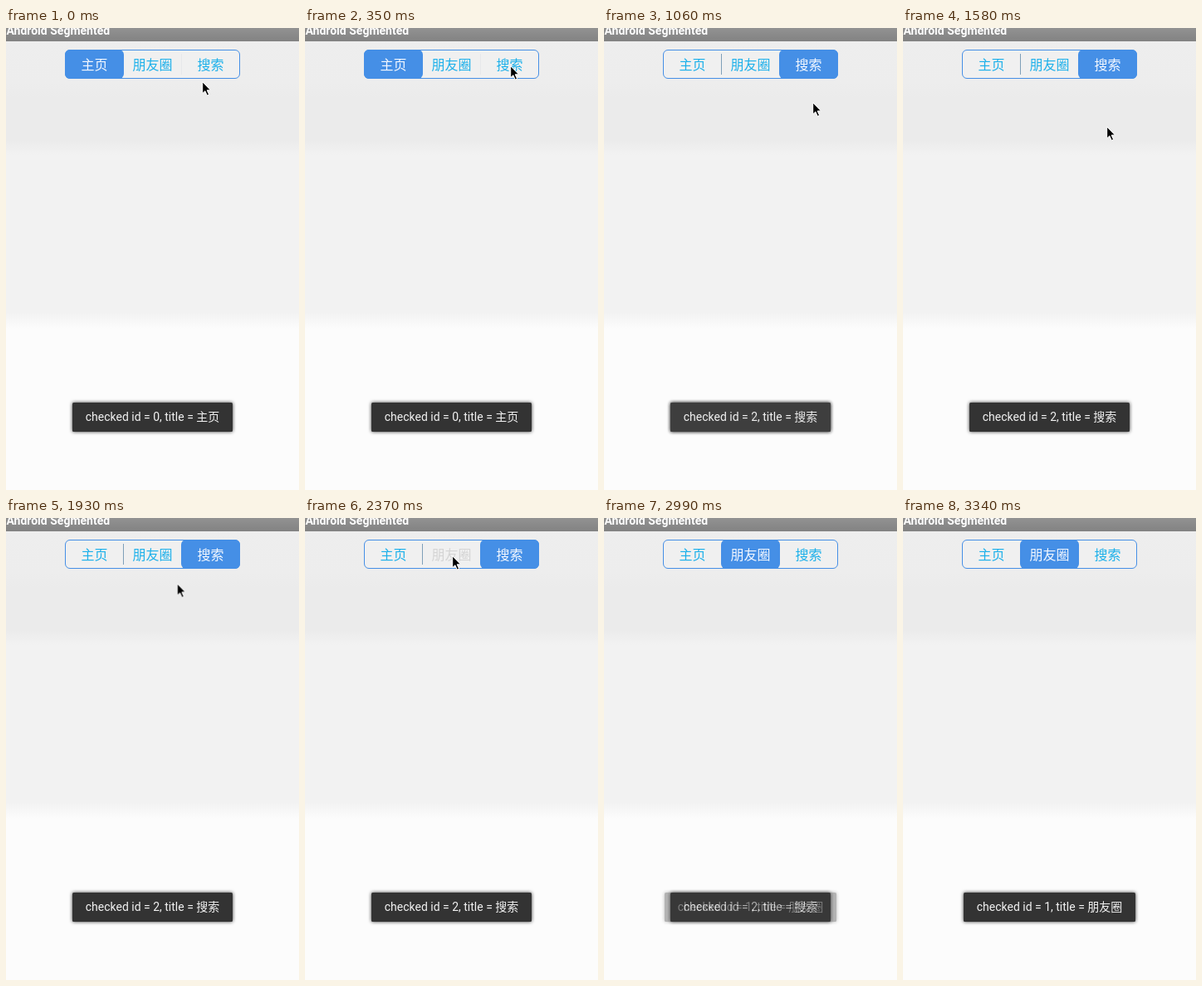
Animation, 353 px wide and 555 px high, one loop 3750 ms. Source, as an HTML page:

```html
<!DOCTYPE html>
<html lang="zh-CN">
<head>
<meta charset="utf-8">
<title>Segmented control</title>
<style>
html, body { margin: 0; width: 100%; height: 100%; overflow: hidden; background: #fcfcfc; }
svg { display: block; width: 353px; height: 555px; }
text { font-family: Roboto, "Noto Sans CJK SC", "Noto Sans CJK", sans-serif; }
.title { font-size: 14px; font-weight: 700; fill: #fff; }
.label { font-size: 16px; text-anchor: middle; fill: #1cb0ea; }
.toast text { font-size: 14px; text-anchor: middle; fill: #f2f2f2; }
.toast rect { fill: #333; filter: drop-shadow(0 0.5px 2px rgba(0, 0, 0, .8)); }

/* One shared clock; values hold until the next keyframe by default. */
.thumb, .label, .div, .toast, .cursor { animation: 3750ms step-end infinite; }
.thumb { animation-name: thumb; }
.home { animation-name: home; }
.friends { animation-name: friends; }
.search { animation-name: search; }
.div.left { animation-name: left; }
.div.right { animation-name: right; }
.t0 { animation-name: t0; }
.t1 { animation-name: t1; }
.t2 { animation-name: t2; }
.cursor { animation-name: cursor; }

@keyframes thumb {
  0% { transform: translateX(0); }
  18.93% { transform: translateX(140px); }
  65.6%, 100% { transform: translateX(70px); }
}
@keyframes home {
  0% { fill: #f4f8ff; }
  18.93%, 100% { fill: #1cb0ea; }
}
@keyframes friends {
  0% { fill: #1cb0ea; }
  63.2% { fill: #d4d4d4; }
  65.6%, 100% { fill: #f4f8ff; }
}
@keyframes search {
  0% { fill: #1cb0ea; }
  16.53% { fill: #d4d4d4; }
  18.93% { fill: #f4f8ff; }
  65.6%, 100% { fill: #1cb0ea; }
}
@keyframes left {
  0% { opacity: 0; }
  18.93% { opacity: 1; }
  65.6%, 100% { opacity: 0; }
}
@keyframes right {
  0% { opacity: 1; }
  18.93%, 100% { opacity: 0; }
}

/* Toasts cross-fade: quick in, late out. */
@keyframes t0 {
  0% { opacity: 1; }
  23.73% { opacity: .96; }
  25.87% { opacity: .84; }
  28.27% { opacity: .64; }
  30.4% { opacity: .36; }
  32.8%, 100% { opacity: 0; }
}
@keyframes t2 {
  0% { opacity: 0; }
  23.73% { opacity: .36; }
  25.87% { opacity: .64; }
  28.27% { opacity: .84; }
  30.4% { opacity: .96; }
  32.8% { opacity: 1; }
  79.73% { opacity: .96; }
  82.13% { opacity: .84; }
  84.53% { opacity: .64; }
  86.93% { opacity: .36; }
  89.07%, 100% { opacity: 0; }
}
@keyframes t1 {
  0% { opacity: 0; }
  79.73% { opacity: .36; }
  82.13% { opacity: .64; }
  84.53% { opacity: .84; }
  86.93% { opacity: .96; }
  89.07%, 100% { opacity: 1; }
}

@keyframes cursor {
  0% { transform: translate(236px, 64px); opacity: 1; animation-timing-function: steps(4); }
  9.33% { transform: translate(247px, 45px); opacity: 1; }
  18.93% { transform: translate(247px, 45px); opacity: 1; animation-timing-function: steps(4); }
  28.27% { transform: translate(251px, 89px); opacity: 1; animation-timing-function: steps(2); }
  32.8% { transform: translate(252px, 100px); opacity: 1; animation-timing-function: steps(2); }
  37.6% { transform: translate(251px, 116px); opacity: 1; animation-timing-function: steps(2); }
  42.13% { transform: translate(245px, 118px); opacity: 1; animation-timing-function: steps(2); }
  46.67% { transform: translate(220px, 95px); opacity: 1; animation-timing-function: steps(6); }
  61.07% { transform: translate(177px, 45px); opacity: 1; }
  70.4% { transform: translate(183px, 62px); opacity: 1; }
  72.8% { transform: translate(240px, 256px); opacity: 1; }
  75.2% { transform: translate(317px, 412px); opacity: 1; }
  77.47% { transform: translate(339px, 508px); opacity: 1; }
  79.73%, 100% { transform: translate(339px, 508px); opacity: 0; }
}
</style>
</head>
<body>
<svg viewBox="0 0 353 555">
  <defs>
    <linearGradient id="page" gradientUnits="userSpaceOnUse" x1="0" y1="0" x2="0" y2="555">
      <stop offset="0" stop-color="#eee"/>
      <stop offset=".12" stop-color="#ededed"/>
      <stop offset=".15" stop-color="#ebebeb"/>
      <stop offset=".243" stop-color="#ebebeb"/>
      <stop offset=".275" stop-color="#f2f2f2"/>
      <stop offset=".615" stop-color="#f2f2f2"/>
      <stop offset=".65" stop-color="#fcfcfc"/>
    </linearGradient>
    <linearGradient id="bar" x1="0" y1="0" x2="0" y2="1">
      <stop offset="0" stop-color="#929292"/>
      <stop offset="1" stop-color="#828282"/>
    </linearGradient>
  </defs>

  <rect width="353" height="555" fill="url(#page)"/>
  <rect width="353" height="16" fill="url(#bar)"/>
  <text class="title" x="0.5" y="8">Android Segmented</text>

  <rect x="71.5" y="26.5" width="210" height="34" rx="5.5" fill="#f0f0f0" stroke="#458fe6"/>
  <path class="div left" d="M141.5 31V56" stroke="#7f9fb8"/>
  <path class="div right" d="M211.5 31V56" stroke="#e6e8ea"/>
  <rect class="thumb" x="71" y="26" width="71" height="35" rx="6" fill="#458fe6"/>
  <text class="label home" x="106.5" y="50">主页</text>
  <text class="label friends" x="176.5" y="50">朋友圈</text>
  <text class="label search" x="246.5" y="50">搜索</text>

  <g class="toast t0">
    <rect x="80" y="450" width="193" height="35" rx="1.5"/>
    <text x="176.5" y="472">checked id = 0, title = 主页</text>
  </g>
  <g class="toast t2">
    <rect x="80" y="450" width="193" height="35" rx="1.5"/>
    <text x="176.5" y="472">checked id = 2, title = 搜索</text>
  </g>
  <g class="toast t1">
    <rect x="73" y="450" width="207" height="35" rx="1.5"/>
    <text x="176.5" y="472">checked id = 1, title = 朋友圈</text>
  </g>

  <path class="cursor" d="M.7 .7V14.6L3.9 11.7L6.3 17.1L8.6 16.1L6.2 10.8H10.5Z" fill="#000" stroke="#fff" stroke-width="1"/>
</svg>
</body>
</html>
```
